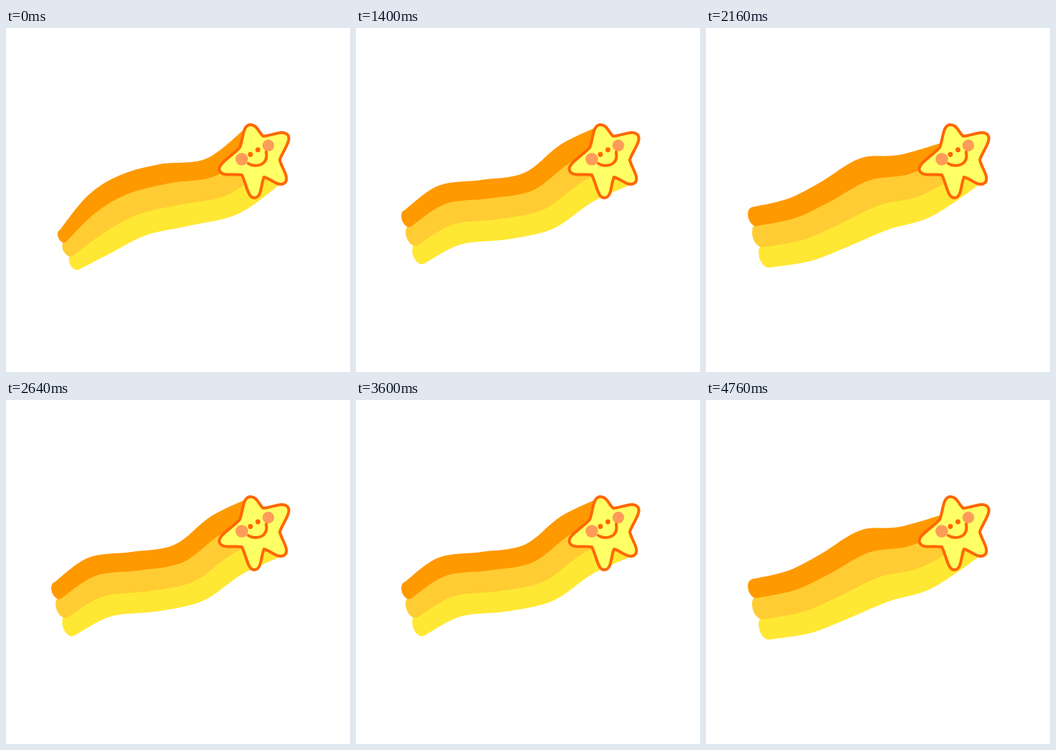
These frames come from a looping animation (480 by 480 pixels, 4800 ms). An HTML page with a canvas:

```html
<!DOCTYPE html>
<html lang="en">
<head>
<meta charset="utf-8">
<title>Shooting star</title>
<style>
  html, body { margin: 0; width: 100%; height: 100%; overflow: hidden; background: #fff; }
  canvas { display: block; width: 480px; height: 480px; }
</style>
</head>
<body>
<canvas id="stage" width="480" height="480"></canvas>
<script>
const ctx = document.getElementById('stage').getContext('2d');

const POSE_MS = 80;
const OUTLINE = '#ff6600';
const STAR = '#ffff66';
const CHEEK = '#ff9b59';

// Share of the trail's thickness that each band spans; bands overlap slightly
// and are painted from the lowest up.
const BANDS = [
  { color: '#ffe833', from: 0.61, to: 1 },
  { color: '#ffcc33', from: 0.27, to: 0.66 },
  { color: '#ff9900', from: 0, to: 0.31 }
];

// Key points of the waving trail, tail to star: x and y of the top edge, thickness
const WAVES = [
  [[75, 282, 55], [115, 233, 81], [160, 205, 84], [215, 190, 86], [280, 182, 77], [336, 138, 78]],
  [[68, 254, 75], [115, 220, 82], [175, 212, 83], [235, 202, 78], [285, 163, 80], [336, 138, 80]],
  [[63, 254, 78], [115, 226, 84], [175, 216, 86], [225, 194, 92], [275, 171, 88], [336, 147, 70]],
  [[64, 250, 84], [115, 238, 87], [160, 215, 91], [215, 182, 99], [270, 177, 86], [336, 158, 58]]
];

const STAR_TIPS = [[340, 135], [393, 149], [389, 216], [347, 237], [298, 199]];
const STAR_NOTCHES = [[326, 167], [359, 151], [382, 184], [360, 208], [329, 205]];

const lerp = (a, b, t) => a.map((v, i) => v + (b[i] - v) * t);

// The trail leans towards the star as it gets lower
function edge(wave, share) {
  return wave.map(([x, y, drop], i) => {
    const lean = 27 + 22 * i / (wave.length - 1);
    return [x + lean * share, y + drop * share];
  });
}

function curveThrough(path, pts) {
  const at = i => pts[Math.max(0, Math.min(pts.length - 1, i))];
  path.lineTo(...pts[0]);
  for (let i = 0; i < pts.length - 1; i++) {
    const [a, b, c, d] = [at(i - 1), at(i), at(i + 1), at(i + 2)];
    path.bezierCurveTo(
      b[0] + (c[0] - a[0]) / 6, b[1] + (c[1] - a[1]) / 6,
      c[0] - (d[0] - b[0]) / 6, c[1] - (d[1] - b[1]) / 6,
      ...c);
  }
}

function bandPath(wave, { from, to }) {
  const path = new Path2D();
  const upper = edge(wave, from).reverse();
  const lower = edge(wave, to);
  const [px, py] = upper[upper.length - 1];
  const [qx, qy] = lower[0];
  const bulgeX = (py - qy) * 0.45;
  const bulgeY = (qx - px) * 0.45;
  curveThrough(path, upper);
  path.bezierCurveTo(px + bulgeX, py + bulgeY, qx + bulgeX, qy + bulgeY, qx, qy);
  curveThrough(path, lower);
  path.closePath();
  return path;
}

// Each arm runs from notch to notch around a rounded tip
function starPath() {
  const path = new Path2D();
  const roundness = 10;
  path.moveTo(...STAR_NOTCHES[0]);
  STAR_TIPS.forEach((tip, i) => {
    const start = STAR_NOTCHES[i];
    const end = STAR_NOTCHES[(i + 1) % STAR_NOTCHES.length];
    const base = lerp(start, end, 0.5);
    const dx = tip[0] - base[0];
    const dy = tip[1] - base[1];
    const scale = roundness / Math.hypot(dx, dy);
    const side = [-dy * scale, dx * scale];
    path.bezierCurveTo(...lerp(start, tip, 0.35), tip[0] - side[0], tip[1] - side[1], ...tip);
    path.bezierCurveTo(tip[0] + side[0], tip[1] + side[1], ...lerp(end, tip, 0.35), ...end);
  });
  path.closePath();
  return path;
}

const trails = WAVES.map(wave =>
  BANDS.map(band => ({ color: band.color, path: bandPath(wave, band) })));
const star = starPath();
const smile = new Path2D('M338 189C346 195 367 193 363 173');

function dot(x, y, r, color) {
  ctx.fillStyle = color;
  ctx.beginPath();
  ctx.arc(x, y, r, 0, Math.PI * 2);
  ctx.fill();
}

function drawTrail(trail) {
  for (const { color, path } of trail) {
    ctx.fillStyle = color;
    ctx.fill(path);
  }
}

function drawStar() {
  ctx.fillStyle = STAR;
  ctx.strokeStyle = OUTLINE;
  ctx.lineWidth = 4;
  ctx.fill(star);
  ctx.stroke(star);
  dot(329, 183, 8.8, CHEEK);
  dot(366, 164, 8.2, CHEEK);
  dot(341, 176.5, 3.4, OUTLINE);
  dot(351.5, 170, 3.4, OUTLINE);
  ctx.stroke(smile);
}

function render(ms) {
  ctx.fillStyle = '#fff';
  ctx.fillRect(0, 0, 480, 480);
  drawTrail(trails[Math.floor(ms / POSE_MS) % trails.length]);
  drawStar();
}

ctx.lineCap = ctx.lineJoin = 'round';
const start = performance.now();
function tick() {
  render(performance.now() - start);
  requestAnimationFrame(tick);
}
tick();
</script>
</body>
</html>
```
